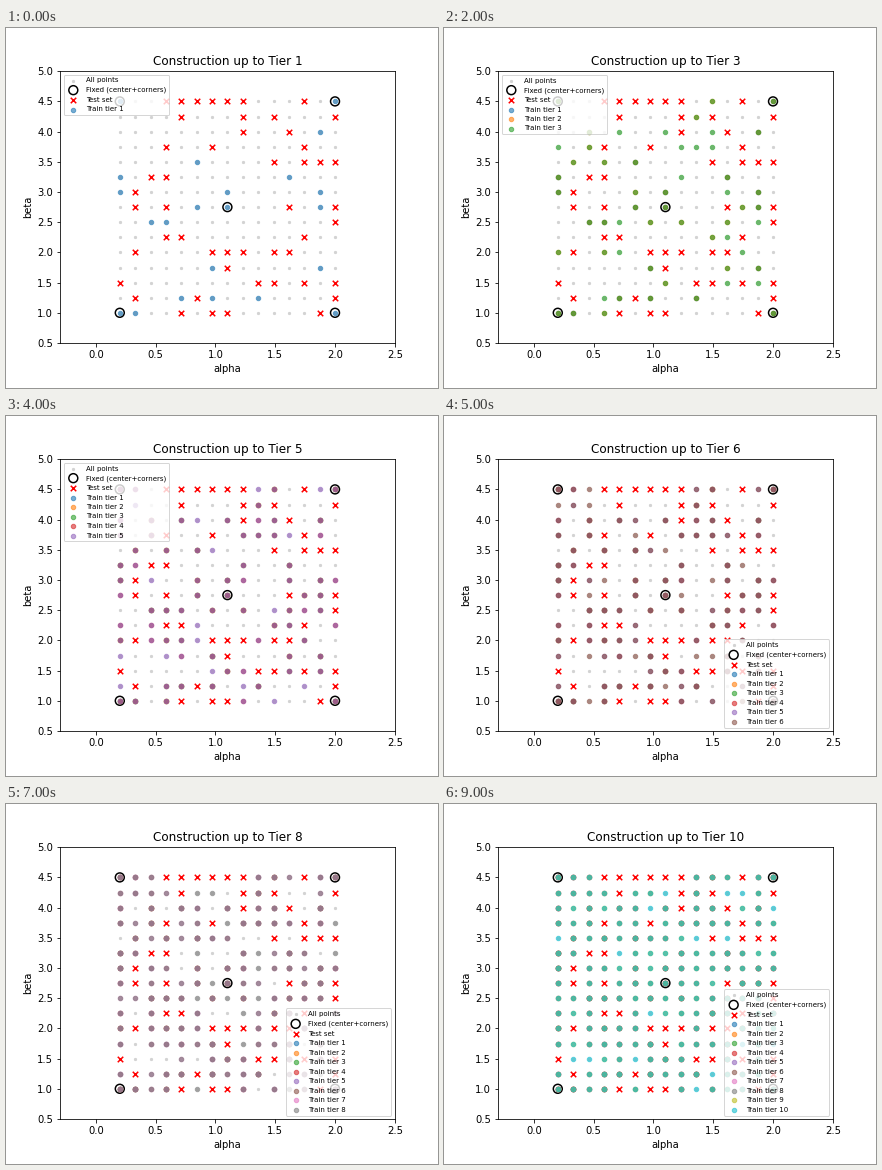
Animation, 432 px wide and 360 px high, one loop 10000 ms. Source, as a matplotlib script:

```python
import numpy as np
import matplotlib.pyplot as plt
from matplotlib.animation import FuncAnimation

N = 15
TIERS = 10
TEST_SIZE = 50

# All grid points, one alpha column after another.
grid = np.array([(a, b) for a in np.linspace(0.2, 2.0, N)
                 for b in np.linspace(1.0, 4.5, N)])

# The corners and the center belong to every tier.
total = N * N
fixed = np.array([0, N - 1, total // 2, total - N, total - 1])
others = np.setdiff1d(np.arange(total), fixed)

# Shuffle the rest: first the test set, then equal shares for the tiers.
order = np.random.RandomState(42).permutation(others)[::-1]
test = order[:TEST_SIZE]
shares = np.array_split(order[TEST_SIZE:], TIERS)

fig = plt.figure(figsize=(6, 5), dpi=72, facecolor="white")
fig.subplots_adjust(left=0.125, right=0.9, bottom=0.125, top=0.88)
ax = fig.add_subplot()


def dots(points, label, **style):
    ax.scatter(*grid[points].T, label=label, **style)


def draw(frame):
    top = frame + 1
    ax.clear()
    dots(np.arange(total), "All points", s=5, color="lightgray")
    dots(fixed, "Fixed (center+corners)", s=80, facecolors="none",
         edgecolors="black", linewidths=1.5)
    dots(test, "Test set", s=30, c="red", marker="x")

    # Each tier contains all the smaller ones, so the colours stack up.
    train = fixed
    for k, share in enumerate(shares[:top]):
        train = np.concatenate([train, share])
        dots(train, f"Train tier {k + 1}", s=20, color=f"C{k}", alpha=0.6)

    ax.set_xlim(-0.3, 2.5)
    ax.set_ylim(0.5, 5.0)
    ax.set_xticks(np.arange(0, 2.6, 0.5))
    ax.set_yticks(np.arange(0.5, 5.1, 0.5))
    ax.set_xlabel("alpha")
    ax.set_ylabel("beta")
    ax.set_title(f"Construction up to Tier {top}")
    ax.legend(loc="upper left" if top <= 5 else "lower right", fontsize=7)
    return []


anim = FuncAnimation(fig, draw, frames=TIERS, interval=1000,
                     init_func=lambda: draw(0), repeat=True, repeat_delay=0)
plt.show()
```
